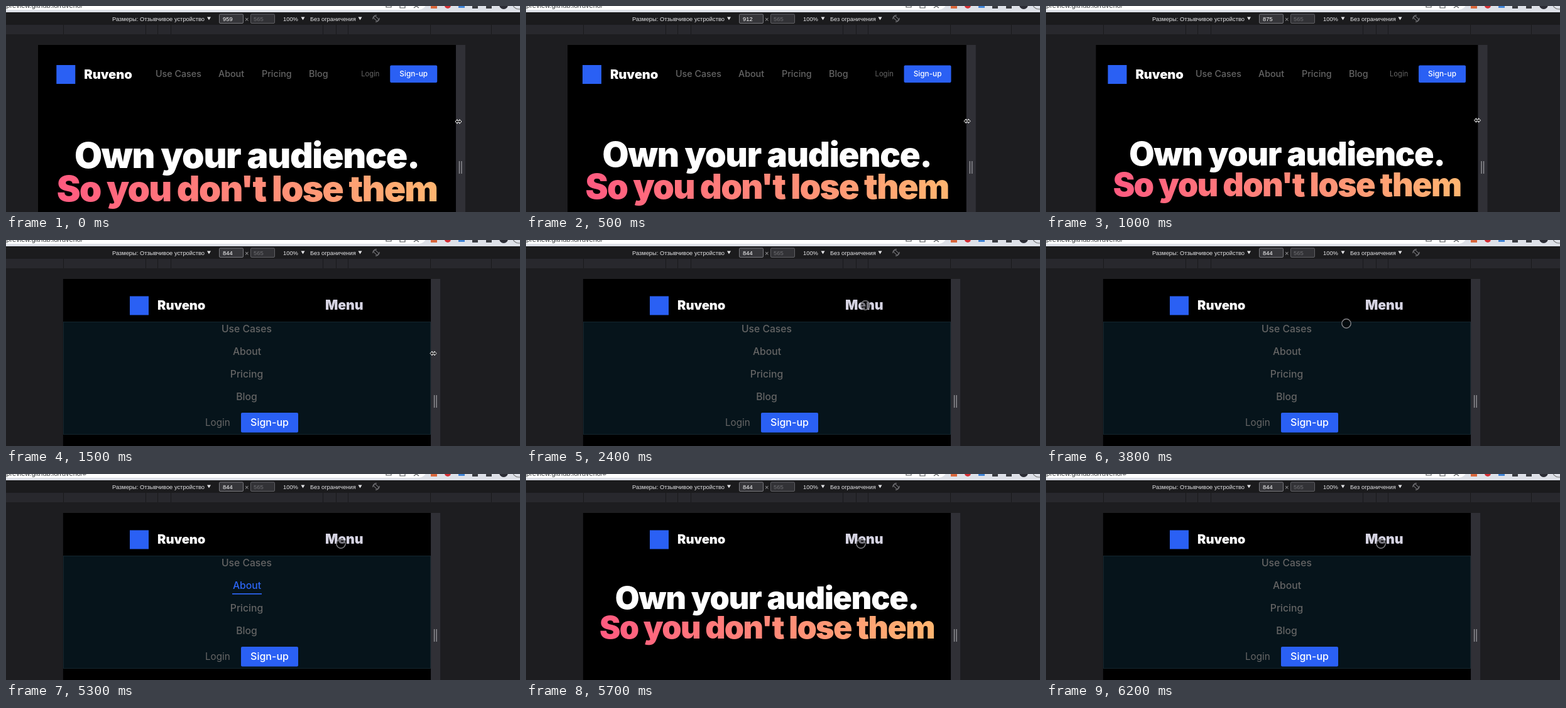
These frames come from a looping animation (818 px wide and 328 px high, 6700 ms). An HTML page:

```html
<!DOCTYPE html>
<html lang="ru">
<head>
<meta charset="utf-8">
<title>Responsive header</title>
<style>
html, body { margin: 0; width: 100%; height: 100%; overflow: hidden; background: #1d1d20; }
svg { display: block; width: 818px; height: 328px; font-family: Inter, "Open Sans", sans-serif; }
.ui { font: 9.33px "Liberation Sans", Arial, sans-serif; fill: #e4e4e6; }
.url { font: 11px "Liberation Sans", Arial, sans-serif; fill: #3c4043; }
.brand { font-size: 20.2px; font-weight: 900; fill: #fff; letter-spacing: -.1px; }
.head { font-weight: 900; letter-spacing: -.033em; text-anchor: middle; fill: #fff; }
#line1 { letter-spacing: -.023em; }
#line2 { fill: url(#warm); }
.nav { font-weight: 500; fill: #646464; }
.login { fill: #666; }
.sign { font-weight: 500; fill: #fff; text-anchor: middle; }
.mid { text-anchor: middle; }
</style>
</head>
<body>
<svg viewBox="0 0 818 328">
  <defs>
    <linearGradient id="warm">
      <stop offset="0" stop-color="#ff5a80"/>
      <stop offset="1" stop-color="#ffb570"/>
    </linearGradient>
  </defs>
  <rect width="818" height="328" fill="#1d1d20"/>

  <g id="browser">
    <rect width="818" height="10" fill="#dee1e8"/>
    <rect x="-30" y="-22" width="700" height="28" rx="14" fill="#fff"/>
    <text class="url" x="122" y="2.5" text-anchor="end">preview.github.io/ruveno/</text>
    <text class="url" id="hash" x="122" y="2.5">#</text>
    <g fill="none" stroke="#55585c" stroke-width="1.2">
      <path d="M605 -2V2H613V-2M627 -2V3H635V-2M649 3L653 0L657 3"/>
      <rect x="806" y="-16" width="40" height="21" rx="10" stroke="#777"/>
    </g>
    <rect x="676" y="-6" width="10" height="10" fill="#d9673c"/>
    <circle cx="703" cy="-1" r="5" fill="#d52f35"/>
    <rect x="720" y="-6" width="10" height="9" fill="#3f83d6"/>
    <rect x="742" y="-6" width="9" height="10" fill="#3b3d42"/>
    <rect x="764" y="-6" width="9" height="10" fill="#3b3d42"/>
    <circle cx="792" cy="-2" r="7" fill="#2c2d35"/>
  </g>

  <g id="toolbar" class="ui">
    <rect y="10" width="818" height="20" fill="#1b1b1d"/>
    <text x="169" y="23.5">Размеры: Отзывчивое устройство</text>
    <rect x="339.5" y="13" width="38" height="14.5" rx="1.5" fill="#36363a" stroke="#77777c"/>
    <text id="size" x="345" y="23.7" fill="#fff"></text>
    <text x="380" y="24.5" font-size="11" fill="#a0a0a3">×</text>
    <rect x="389.5" y="13" width="38" height="14.5" rx="1.5" fill="#323236" stroke="#5f5f64"/>
    <text x="394" y="23.7" fill="#707074">565</text>
    <text x="441" y="23.5">100%</text>
    <text x="484" y="23.5">Без ограничения</text>
    <path d="M320 17.5h6l-3 5zM469.5 17.5h6l-3 5zM560.5 17.5h6l-3 5z"/>
    <g fill="none" stroke="#9a9a9f" stroke-width=".9" transform="translate(589 20)">
      <rect x="-2" y="-4" width="4" height="8" rx="1" transform="rotate(-45)"/>
      <path d="M-5 1A5 5 0 0 1 1 -5M5 -1A5 5 0 0 1 -1 5"/>
    </g>
    <rect y="30" width="818" height="15" fill="#28282d"/>
    <path id="ticks" stroke="#19191c"/>
  </g>

  <rect id="page" y="62" height="266"/>
  <g id="grip">
    <rect y="62" width="15" height="266" fill="#303036"/>
    <path d="M5.5 247V267M9 247V267" stroke="#98989d" stroke-width="1.3"/>
  </g>

  <text id="line1" class="head">Own your audience.</text>
  <text id="line2" class="head">So you don't lose them</text>

  <g id="wide">
    <g id="wideBrand">
      <rect y="94" width="30" height="30" fill="#2a60f4"/>
      <text class="brand" x="44" y="115.5">Ruveno</text>
    </g>
    <g class="nav" font-size="14.3">
      <text x="238" y="113">Use Cases</text>
      <text x="338" y="113">About</text>
      <text x="407" y="113">Pricing</text>
      <text x="482" y="113">Blog</text>
    </g>
    <g id="wideSign">
      <text class="login" x="-121.5" y="112" font-size="11.2">Login</text>
      <rect x="-75.5" y="94.5" width="75" height="27.5" rx="2" fill="#2a60f4"/>
      <text class="sign" x="-38" y="112" font-size="11.8">Sign-up</text>
    </g>
  </g>

  <g id="narrow">
    <rect x="197" y="89.5" width="30" height="30" fill="#2a60f4"/>
    <text class="brand" x="241" y="111">Ruveno</text>
    <text class="brand" x="508" y="111" style="fill:#d6d4e3;font-size:21.3px">Menu</text>
    <g id="menu">
      <rect x="91" y="310" width="585" height="18"/>
      <rect x="91.5" y="130.5" width="584" height="179" fill="#06141b" stroke="#14252d"/>
      <g class="nav mid" font-size="15.7">
        <text x="383" y="147">Use Cases</text>
        <text id="about" x="383.5" y="183">About</text>
        <text x="383" y="219">Pricing</text>
        <text x="383" y="255">Blog</text>
      </g>
      <rect id="underline" x="360" y="190" height="1.7" fill="#2d66f6"/>
      <text class="login" x="317" y="296" font-size="15.2">Login</text>
      <rect x="374" y="275" width="91" height="31.5" rx="2" fill="#2a60f4"/>
      <text class="sign" x="419.5" y="296" font-size="16">Sign-up</text>
    </g>
  </g>

  <path id="resize" d="M-5 0L-1.8 -3.4V-1.3H1.8V-3.4L5 0L1.8 3.4V1.3H-1.8V3.4Z" fill="#111" stroke="#fff"/>
  <circle id="touch" r="7.2" fill="#000" fill-opacity=".45" stroke="#858589" stroke-width="1.4"/>
</svg>
<script>
const LOOP = 6700, STEP = 100, CENTER = 383.5, SCALE = 0.6934;
const BREAKPOINT = 850, TAP_ABOUT = 4700, CLOSE_AGAIN = 5600;
const $ = id => document.getElementById(id);
const show = (id, on) => $(id).setAttribute('display', on ? 'inline' : 'none');
const move = (id, x, y = 0) => $(id).setAttribute('transform', `translate(${x} ${y})`);
const set = (id, attrs) => {
  for (const [key, value] of Object.entries(attrs)) $(id).setAttribute(key, value);
};
const between = (t, from, to) => t >= from && t < to;

// Linear interpolation through [time, ...values] keys.
function track(keys, t) {
  const i = keys.findIndex(k => k[0] > t);
  if (i === 0) return keys[0].slice(1);
  if (i < 0) return keys[keys.length - 1].slice(1);
  const a = keys[i - 1], b = keys[i], p = (t - a[0]) / (b[0] - a[0]);
  return a.slice(1).map((v, n) => v + (b[n + 1] - v) * p);
}

const widthKeys = [[0, 959], [50, 959], [700, 896], [1000, 877], [1400, 847], [1500, 844]];
const cursorKeys = [
  [0, 720, 184], [700, 695, 183], [1000, 686.5, 182], [1500, 680, 180.5],
  [2000, 540, 104], [3700, 540, 104], [3800, 478, 133], [4000, 400, 188],
  [4100, 394, 191], [4300, 386, 182], [4700, 386, 181], [5100, 529, 117], [5300, 533, 111]
];

$('ticks').setAttribute('d',
  [91, 222, 241, 262, 504, 525, 544, 675, 772].map(x => `M${x}.5 30V45`).join(''));

function heading(w, narrow) {
  const y = narrow ? 215 : 258 - (665 - w) * 0.07;
  const size = w * 0.0857;
  set('line1', { x: CENTER, y, 'font-size': size });
  set('line2', { x: CENTER, y: y + w * 0.0798, 'font-size': size });
}

function render(now) {
  const t = Math.floor(now % LOOP / STEP) * STEP;
  const [cssWidth] = track(widthKeys, t);
  const w = cssWidth * SCALE, left = CENTER - w / 2, right = left + w;
  const narrow = cssWidth < BREAKPOINT;

  $('size').textContent = Math.round(track(widthKeys, t + 30)[0]);
  set('page', { x: left, width: w });
  move('grip', right);
  heading(w, narrow);

  const pad = 19 + (w - 608) * 0.18;
  show('wide', !narrow);
  show('narrow', narrow);
  move('wideBrand', left + pad);
  move('wideSign', right - pad);
  show('menu', !between(t, 2500, 3200) && !between(t, CLOSE_AGAIN, 6200));

  const active = between(t, TAP_ABOUT, CLOSE_AGAIN);
  const grow = Math.min(1, Math.max(0, (t - TAP_ABOUT) / 500));
  $('about').style.fill = active ? '#2d66f6' : '';
  $('underline').setAttribute('width', active ? 47 * (1 - (1 - grow) ** 2) : 0);
  show('hash', t >= TAP_ABOUT);

  const [x, y] = track(cursorKeys, t);
  show('resize', t <= 1500);
  show('touch', t > 1500);
  move('resize', x, y);
  move('touch', x, y);
}

const start = performance.now();
function frame() {
  render(performance.now() - start);
  requestAnimationFrame(frame);
}
render(0);
requestAnimationFrame(frame);
</script>
</body>
</html>
```
